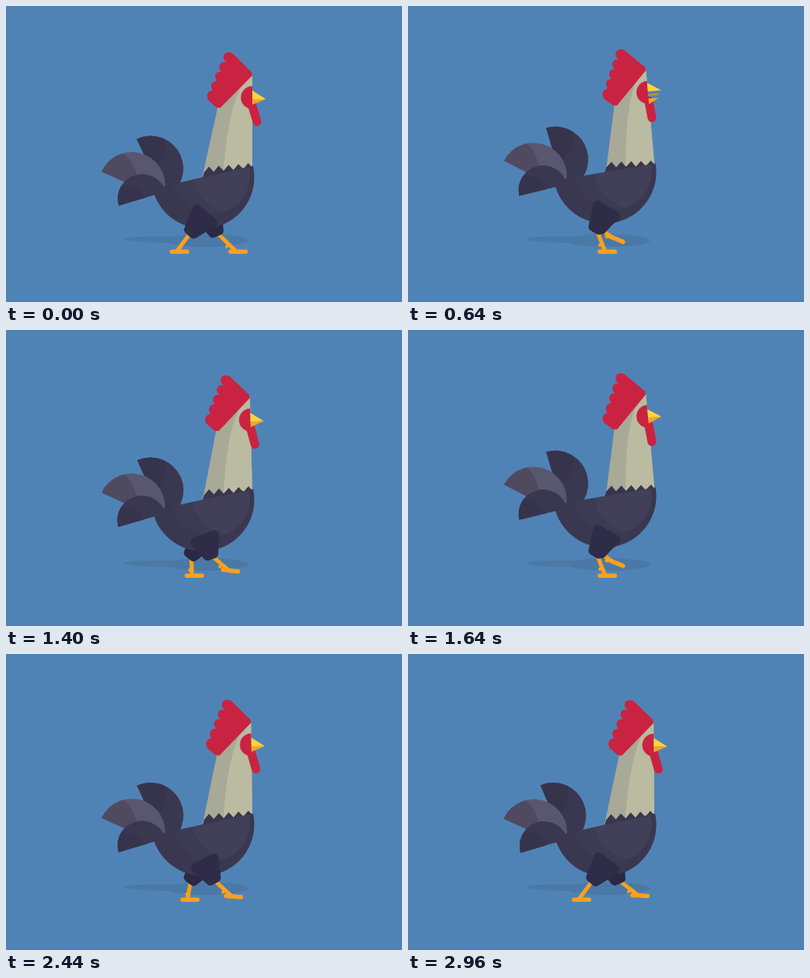
Animation, 500 px wide and 375 px high, one loop 3 s. Source, as an HTML page with a canvas:

```html
<!DOCTYPE html>
<html lang="en">
<head>
<meta charset="utf-8">
<title>Strutting rooster</title>
<style>
html, body { margin: 0; width: 100%; height: 100%; overflow: hidden; background: #5083b5; }
canvas { display: block; width: 500px; height: 375px; }
</style>
</head>
<body>
<canvas id="stage" width="500" height="375"></canvas>
<script>
const ctx = document.getElementById('stage').getContext('2d');
const LOOP = 3000, CYCLE = 1000, STEP = 40;
const { PI, sin, atan2, sqrt, abs, min, max } = Math;
const RAD = PI / 180;
const SKY = '#5083b5', RED = '#ca2341', ORANGE = '#fba01c';

// drag and swing are the easing powers on the ground and in the air
const NEAR = { front: 291, back: 219, drag: 2.4, swing: 1.4, height: 11 };
const FAR = { front: 293, back: 224, drag: 1, swing: 2.5, height: 21 };

// Ground contact for the first half of the phase, swing for the second
function stride(leg, phase, lift) {
  const air = max(0, phase * 2 - 1);
  const reach = air ? 1 - (1 - air) ** leg.swing : (1 - phase * 2) ** leg.drag;
  return {
    kneeX: 234 + 31 * (reach - .35 * sin(PI * reach)),
    kneeY: 286 - 4.5 * lift,
    footX: leg.back + (leg.front - leg.back) * reach,
    footY: 311.3 - leg.height * sin(PI * air),
    tilt: 23 * sin(PI * sqrt(air))
  };
}

function poly(color, points, round = 0) {
  ctx.beginPath();
  points.forEach(p => ctx.lineTo(...p));
  ctx.closePath();
  ctx.fillStyle = ctx.strokeStyle = color;
  ctx.fill();
  if (round) {
    ctx.lineWidth = round;
    ctx.stroke();
  }
}

function line(color, width, ...points) {
  ctx.beginPath();
  points.forEach(p => ctx.lineTo(...p));
  ctx.strokeStyle = color;
  ctx.lineWidth = width;
  ctx.stroke();
}

function disc(color, x, y, r, from = 0, to = 360) {
  ctx.beginPath();
  ctx.arc(x, y, r, from * RAD, to * RAD);
  ctx.fillStyle = color;
  ctx.fill();
}

function turned(x, y, deg, draw) {
  ctx.save();
  ctx.translate(x, y);
  ctx.rotate(deg * RAD);
  ctx.translate(-x, -y);
  draw();
  ctx.restore();
}

// Half disc with a shade on the tip side
function feather(x, y, r, angle, color, shade) {
  turned(x, y, angle, () => {
    disc(color, x, y, r, 180, 360);
    ctx.clip();
    disc(shade, x - r * .85, y + r * .2, r);
  });
}

function shin({ kneeX, kneeY, footX, footY, tilt }) {
  const ankle = footX - 3;
  const x = kneeX + (ankle - kneeX) * .65, y = kneeY + (footY - kneeY) * .65;
  line(ORANGE, 5, [kneeX, kneeY], [ankle, footY - 1]);
  line(ORANGE, 4, [x, y], [x - 2.5, y + 2]);
  turned(footX, footY, tilt, () =>
    line(ORANGE, 5.5, [footX - 9.5, footY], [footX + 9.5, footY]));
}

function thigh(color, x, y, { kneeX, kneeY }) {
  const length = Math.hypot(kneeX - x, kneeY - y);
  turned(x, y, atan2(x - kneeX, kneeY - y) / RAD, () =>
    poly(color, [[x - 13, y], [x + 13, y], [x + 4, y + length], [x - 4, y + length]], 12));
}

function drawShadow() {
  ctx.fillStyle = '#4a79a7';
  ctx.beginPath();
  ctx.ellipse(253, 297, 53, 8, 0, 0, 7);
  ctx.ellipse(196, 296, 47, 4, .02, 0, 7);
  ctx.fill();
}

function drawTail(sway) {
  turned(200, 235, sway, () => feather(182.5, 206, 41.5, 65, '#3a3850', '#36344c'));
  feather(159, 227, 42, 24, '#595770', '#504a61');
  feather(172, 244, 31, -17, '#3a3850', '#36344c');
}

function drawBody() {
  const collar = Array.from({ length: 11 }, (_, i) =>
    [250 + 6.2 * i, 211 - .55 * i - (i % 2 ? 7 : 0)]);
  poly('#38364e', [[248, 219], ...collar, [312, 210]]);
  disc('#3a3850', 248.5, 217, 65, -13, 167);
  ctx.save();
  disc('#3d3b53', 259, 215, 49, -13, 167);
  ctx.clip();
  disc('#424058', 287, 208, 53);
  ctx.restore();
}

function drawNeck() {
  poly('#a9a997', [[311, 88], [311, 214], [248, 216], [268, 125]]);
  ctx.beginPath();
  ctx.moveTo(311, 88);
  ctx.lineTo(311, 214);
  ctx.lineTo(274, 214);
  ctx.quadraticCurveTo(280, 130, 299, 98);
  ctx.fillStyle = '#babba0';
  ctx.fill();
}

function drawHead(lift, open) {
  poly(RED, [[285, 61], [309, 85], [309, 88], [270, 127.5], [266, 127], [256, 118]], 3);
  for (let i = 0; i < 5; i++) disc(RED, 281 - 5.2 * i, 65 + 12.2 * i, 6.5);
  disc(RED, 311, 116, 14.5, 90, 270);
  line(RED, 11, [311, 127], [317 - 4 * lift, 146.5 + 2 * lift]);

  const upper = 118 - 3 * open, lower = 118 + 6 * open;
  if (open) line('#b5904e', 2.5, [312, 119.5], [311 + 12 * open, 119.5]);
  poly('#fdd33c', [[311, 107 - 3 * open], [328, upper], [311, upper]]);
  poly('#f6a623', [[311, lower], [328 - 4 * open, lower], [311, lower + 7]]);
}

function draw(time) {
  const phase = time % CYCLE / CYCLE;
  // Each step rises quickly and settles slowly
  const lift = sin(PI * (phase * 2 % 1) ** .6) ** 1.3;
  const sway = 7 * max(0, -sin(2 * PI * phase));
  const open = min(1, max(0, 2 - abs(time - 640) / 70));
  const rise = -6.5 * lift;
  const far = stride(FAR, phase, lift);
  const near = stride(NEAR, (phase + .5) % 1, lift);

  ctx.lineCap = ctx.lineJoin = 'round';
  ctx.fillStyle = SKY;
  ctx.fillRect(0, 0, 500, 375);
  drawShadow();
  shin(far);
  thigh('#2a2843', 254, 260 + rise, far);
  shin(near);

  ctx.save();
  ctx.translate(0, rise);
  turned(250, 217, 3.3 * lift, () => drawTail(sway));
  turned(305, 205, -5.2 * lift, () => {
    drawNeck();
    drawHead(lift, open);
  });
  turned(250, 217, 3.3 * lift, drawBody);
  ctx.restore();
  thigh('#2e2c46', 251, 266 + rise, near);
}

const start = performance.now();
function tick() {
  const time = (performance.now() - start) % LOOP;
  draw(Math.floor(time / STEP) * STEP);
  requestAnimationFrame(tick);
}
tick();
</script>
</body>
</html>
```
